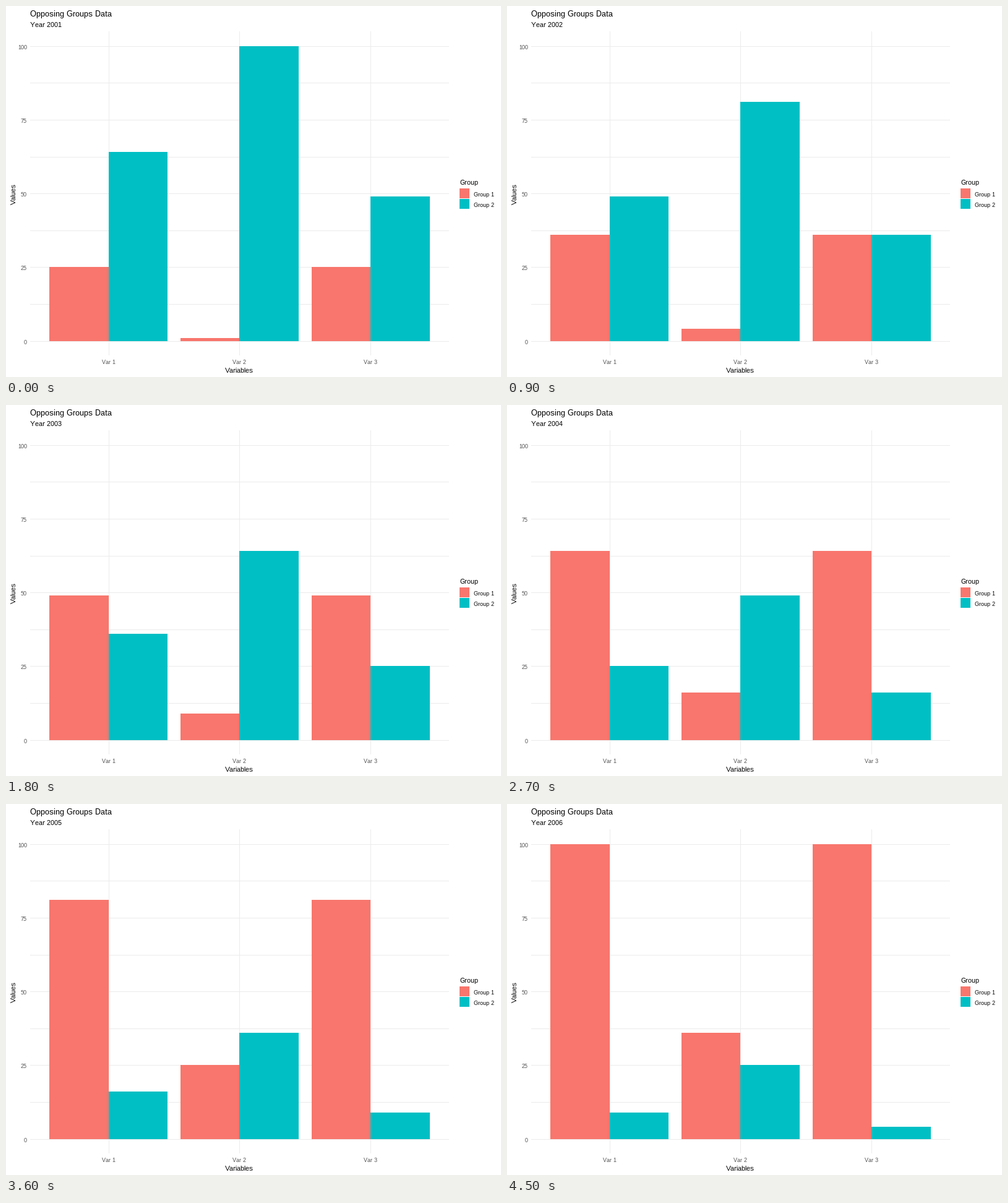
A matplotlib script for the animation above (5.4 s loop, 800 by 600 pixels).

```python
import math

import matplotlib.pyplot as plt
from matplotlib.animation import FuncAnimation
from matplotlib.patches import Rectangle

plt.rcParams.update({
    "font.family": "Liberation Sans",
    "text.hinting": "native",
    "text.hinting_factor": 1,
    "text.kerning_factor": 6,
    "toolbar": "None",
})

W, H, DPI = 800, 600, 72  # at 72 dpi one point is one pixel
RED, TEAL = "#F8766D", "#00BFC4"
GRID, GREY = "#EBEBEB", "#4D4D4D"
LEFT, RIGHT, TOP, BOTTOM = 39, 716, 41, 565
CENTERS = (166, 377, 589)
SPANS = ((70, 261), (282, 473), (494, 685))
ROOTS = ((5, 8), (1, 10), (5, 7))  # square roots of the first year's values

fig = plt.figure(figsize=(W / DPI, H / DPI), dpi=DPI, facecolor="white")
ax = fig.add_axes([0, 0, 1, 1])
ax.set_xlim(0, W)
ax.set_ylim(H, 0)
ax.axis("off")


def row(value):
    """Pixel row of a value on the y axis."""
    return math.floor(542.05 - 4.768 * value)


def box(x0, y0, x1, y1, color, z=1):
    return ax.add_patch(Rectangle((x0, y0), x1 - x0, y1 - y0,
                                  facecolor=color, linewidth=0, zorder=z))


def label(x, y, text, size, color="black", **kw):
    return ax.text(x, y, text, fontsize=size, color=color,
                   ha="left", va="baseline", zorder=5, **kw)


# Grid and axis labels
for i in range(9):
    y = row(12.5 * i)
    box(LEFT, y, RIGHT, y + 1, GRID)
    if i % 2 == 0:
        tick = str(25 * i // 2)
        label(34 - 5 * len(tick), y + 5, tick, 9, GREY)
for i, x in enumerate(CENTERS):
    box(x, TOP, x + 1, BOTTOM, GRID)
    label(x - 11, 579, f"Var {i + 1}", 9, GREY)

# Titles
label(39, 17, "Opposing Groups Data", 13)
year = label(39, 34, "", 11)
label(354, 593, "Variables", 11)
label(16, 321, "Values", 11, rotation=90, rotation_mode="anchor")

# Legend
label(733, 289, "Group", 11)
for i, color in enumerate((RED, TEAL)):
    y = 295 + 17 * i
    box(733, y, 749, y + 16, color)
    label(756, y + 13, f"Group {i + 1}", 9)

base = row(0)
bars = [(box(x0, base, mid, base, RED, 3), box(mid, base, x1, base, TEAL, 3))
        for (x0, x1), mid in zip(SPANS, CENTERS)]


def set_value(bar, value):
    y = row(value)
    bar.set_y(y)
    bar.set_height(base - y)


def update(k):
    year.set_text(f"Year {2001 + k}")
    for (rising, falling), (up, down) in zip(bars, ROOTS):
        set_value(rising, (up + k) ** 2)
        set_value(falling, (down - k) ** 2)
    return [year]


anim = FuncAnimation(fig, update, frames=6, interval=900, repeat=True,
                     repeat_delay=0, cache_frame_data=False)
plt.show()
```
